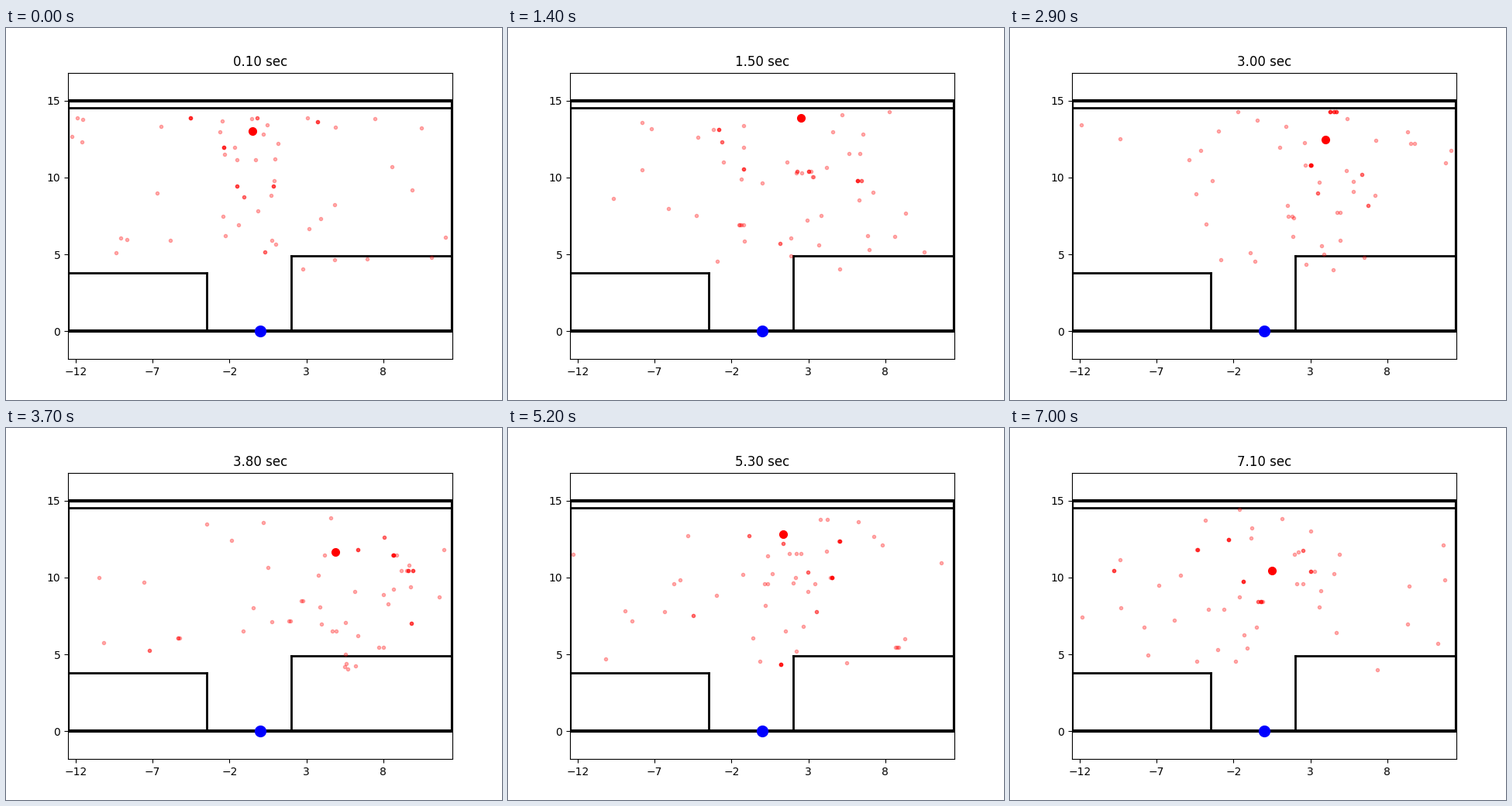
Write a matplotlib script that moves like this. It is 640 px wide and 480 px high and loops after 7100 ms.

```python
import numpy as np
import matplotlib.pyplot as plt
from matplotlib.animation import FuncAnimation

FRAMES, DT = 71, 0.1
COUNT, CLONES = 66, 15
LOW = np.array([-12.4, 3.95])
HIGH = np.array([12.4, 14.45])

# Waypoints of the tracked ball: time in seconds, x, y
PATH = np.array([
    (0.1, -0.5, 13.02), (0.9, 2.02, 14.32), (2.2, 3.08, 13.3),
    (3.8, 4.9, 11.65), (5.3, 1.36, 12.8), (6.3, -5.54, 11.85),
    (7.1, 0.5, 10.45),
])


def ball_at(t):
    return np.array([np.interp(t, PATH[:, 0], PATH[:, k]) for k in (1, 2)])


def scatter(rng, n, ball):
    """Points all over the room, about half of them in the ball's column."""
    points = rng.uniform(LOW, HIGH, (n, 2))
    near = rng.random(n) < 0.5
    points[near, 0] = rng.normal(ball[0], 3.2, near.sum())
    return np.clip(points, LOW, HIGH)


def resample(rng, points, speed, ball):
    """Replace part of the particles and clone a few near the ball."""
    lost = rng.random(COUNT) < 0.3
    points[lost] = scatter(rng, lost.sum(), ball)
    weight = np.exp(-np.sum((points - ball) ** 2, axis=1) / 40) + 0.06
    parents = rng.choice(COUNT, 9, replace=False, p=weight / weight.sum())
    parents = rng.choice(parents, CLONES)
    slots = rng.choice(COUNT, CLONES, replace=False)
    points[slots] = points[parents]
    speed[slots] = speed[parents]


def simulate():
    rng = np.random.default_rng(12)
    points = scatter(rng, COUNT, ball_at(DT))
    speed = rng.normal(0, 1.5, (COUNT, 2))
    clouds = []
    for i in range(FRAMES):
        resample(rng, points, speed, ball_at((i + 1) * DT))
        clouds.append(points.copy())
        points += speed * DT
        points[:, 0] += rng.normal(0, 0.2, COUNT)
        outside = (points < LOW) | (points > HIGH)
        speed[outside] *= -1
        points = np.where(points < LOW, 2 * LOW - points, points)
        points = np.where(points > HIGH, 2 * HIGH - points, points)
    return clouds


clouds = simulate()

fig, ax = plt.subplots(figsize=(6.4, 4.8), dpi=100)
half = 12.5 * 369.6 / 496
ax.set_xlim(-12.5, 12.5)
ax.set_ylim(7.5 - half, 7.5 + half)
ax.set_xticks(range(-12, 12, 5))
ax.set_yticks(range(0, 16, 5))

# Room outline, ceiling rail and the two blocks on the floor
ax.plot([-12.5, 12.5, 12.5, -12.5, -12.5], [0, 0, 15, 15, 0], "k", lw=3)
ax.plot([-12.5, 12.5], [14.53, 14.53], "k", lw=2)
for wall, edge, top in ((-12.5, -3.5, 3.8), (12.5, 2, 4.9)):
    ax.plot([wall, edge], [top, top], "k", lw=2)
    ax.plot([edge, edge], [0, top], "k", lw=2)

ax.plot(0, 0, "bo", ms=10)
dots, = ax.plot([], [], "ro", ms=3, alpha=0.3)
ball, = ax.plot([], [], "ro", ms=7)
title = ax.set_title("")


def update(i):
    t = (i + 1) * DT
    x, y = ball_at(t)
    ball.set_data([x], [y])
    dots.set_data(*clouds[i].T)
    title.set_text(f"{t:.2f} sec")
    return dots, ball, title


anim = FuncAnimation(fig, update, frames=FRAMES, interval=100,
                     repeat=True, repeat_delay=0, blit=False)
plt.show()
```
